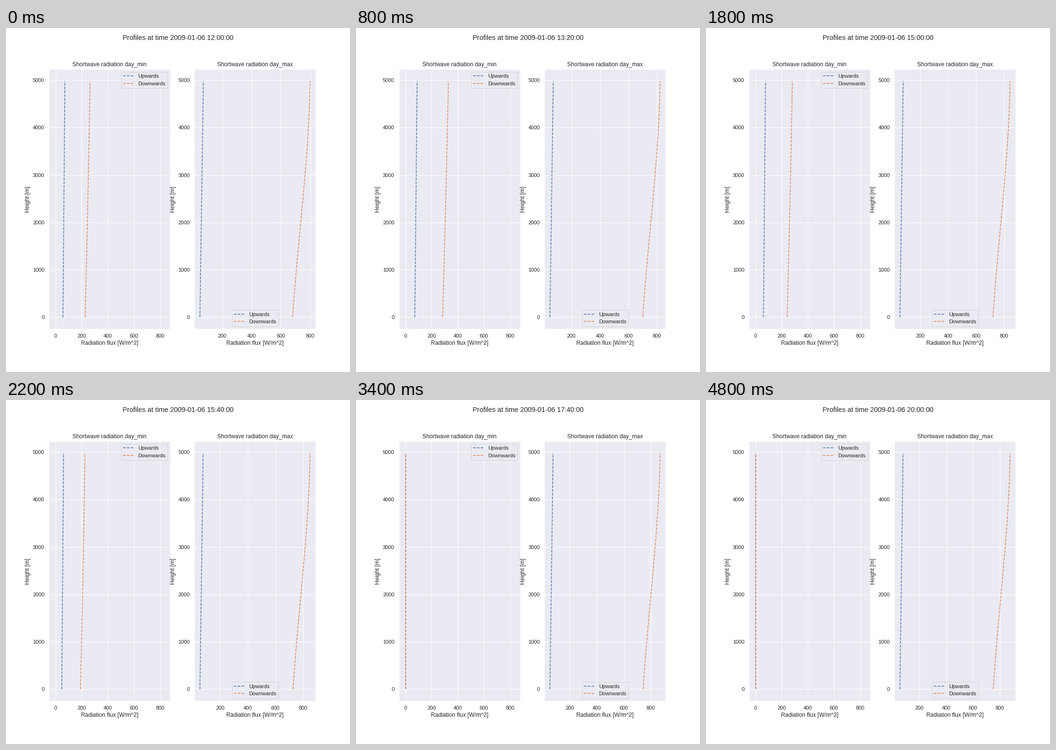
These frames come from a looping animation (720 px wide and 720 px high, 4900 ms). A matplotlib script:

```python
import math

import matplotlib.pyplot as plt
import numpy as np
from matplotlib.animation import FuncAnimation
from matplotlib.ticker import MultipleLocator

FRAMES = 49          # one frame per ten minutes, 12:00 to 20:00
INTERVAL = 100
TOP = 4980
BLUE, ORANGE, INK = "#4C72B0", "#DD8452", "#262626"

plt.rcParams.update({
    "font.family": "Liberation Sans",
    "font.size": 12,
    "text.color": INK,
    "figure.facecolor": "white",
    "figure.titlesize": 14.4,
    "axes.facecolor": "#EAEAF2",
    "axes.edgecolor": "white",
    "axes.labelcolor": INK,
    "axes.linewidth": 1.25,
    "axes.labelsize": 12,
    "axes.titlesize": 12,
    "axes.grid": True,
    "axes.axisbelow": True,
    "grid.color": "white",
    "grid.linewidth": 1,
    "legend.fontsize": 11,
    "lines.linewidth": 1.5,
    "patch.linewidth": 1,
})
for axis in ("xtick", "ytick"):
    plt.rcParams.update({
        f"{axis}.color": INK,
        f"{axis}.labelsize": 11,
        f"{axis}.major.size": 6,
    })
plt.rcParams.update({"xtick.bottom": False, "ytick.left": False})

height = np.linspace(0, TOP, 60)
u = height / TOP


def ramp(low, high, shape=u):
    return low + (high - low) * shape


def winter(n):
    """Upward and downward profiles on the shortest day."""
    top = max(0, 743 * math.cos(2 * math.pi * (n - 9.7) / 144) - 413)
    ground = max(0, top * (0.9 - 12 / (top + 10)))
    up = 0.25 * ground
    return (ramp(up, up + 0.4 * (top - ground)),
            ramp(ground, top, u * (1.2 - 0.2 * u)))


def summer(n):
    """Upward and downward profiles on the longest day."""
    top = 799 + 3.06 * n - 0.03 * n * n
    up = 47 + 0.32 * n - 0.0035 * n * n
    bend = 0.875 * u + 1.0625 * u**2 - 0.9375 * u**3
    return ramp(up, up + 23.5), ramp(0.91 * top - 47, top, bend)


def make_panel(ax, title, legend_loc):
    lines = [ax.plot(0 * u, height, "--", color=color, label=label)[0]
             for color, label in ((BLUE, "Upwards"), (ORANGE, "Downwards"))]
    ax.set_title(title)
    ax.set_xlabel("Radiation flux [W/m^2]")
    ax.set_ylabel("Height [m]")
    ax.set_ylim(-0.05 * TOP, 1.05 * TOP)
    ax.xaxis.set_major_locator(MultipleLocator(200))
    ax.yaxis.set_major_locator(MultipleLocator(1000))
    ax.legend(loc=legend_loc)
    return lines


fig, (ax_min, ax_max) = plt.subplots(1, 2, figsize=(10, 10), dpi=72)
fig.subplots_adjust(left=0.125, right=0.9, bottom=0.125, top=0.88, wspace=0.2)
heading = fig.suptitle("")
min_lines = make_panel(ax_min, "Shortwave radiation day_min", "upper right")
max_lines = make_panel(ax_max, "Shortwave radiation day_max", "lower center")
ax_min.set_xlim(-50, 877)


def update(n):
    hour, minute = divmod(12 * 60 + 10 * n, 60)
    heading.set_text(f"Profiles at time 2009-01-06 {hour}:{minute:02d}:00")
    for lines, profiles in ((min_lines, winter(n)), (max_lines, summer(n))):
        for line, flux in zip(lines, profiles):
            line.set_xdata(flux)
    up, down = summer(n)
    margin = 0.05 * (down[-1] - up[0])
    ax_max.set_xlim(up[0] - margin, down[-1] + margin)
    return [heading, *min_lines, *max_lines]


anim = FuncAnimation(fig, update, frames=FRAMES, interval=INTERVAL,
                     init_func=lambda: update(0), repeat=True,
                     repeat_delay=0, blit=False)
plt.show()
```
